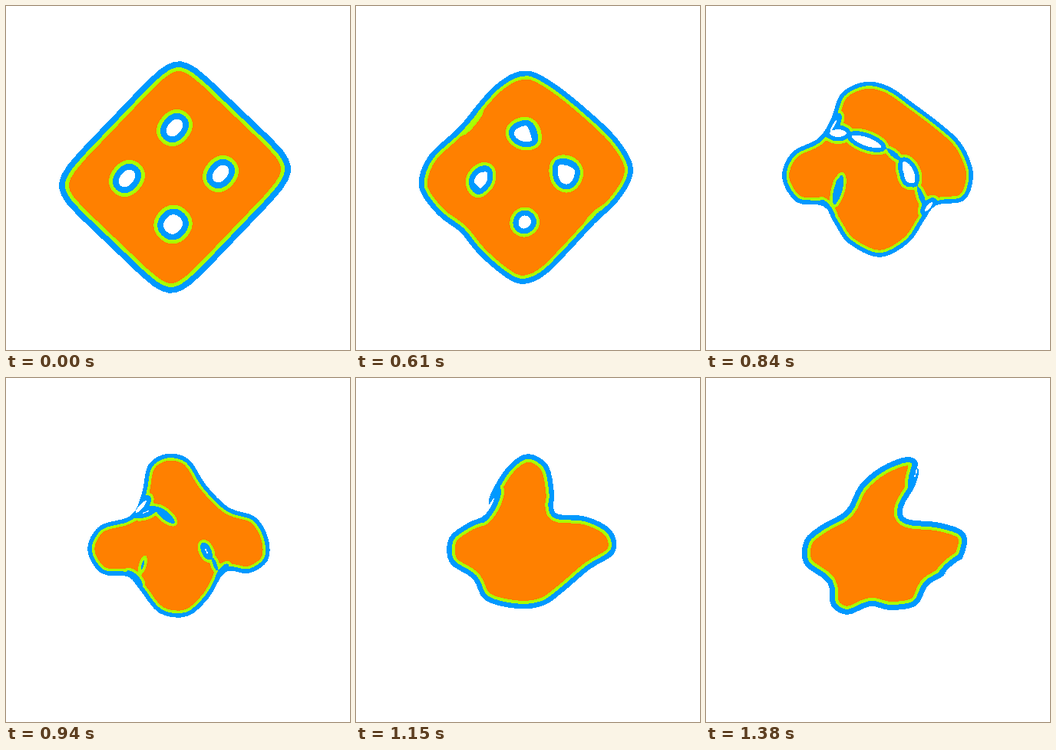
Write an HTML page with a canvas that moves like this. It is 448 px wide and 449 px high and loops after 2280 ms.

```html
<!DOCTYPE html>
<html lang="en">
<head>
<meta charset="utf-8">
<title>Morphing contours</title>
<style>
html, body { margin: 0; width: 100%; height: 100%; overflow: hidden; background: #fff; }
canvas { display: block; }
</style>
</head>
<body>
<canvas id="stage" width="448" height="449"></canvas>
<script>
const LOOP = 2280;
const LEFT = 60, TOP = 60, STEP = 2, COLS = 161, ROWS = 165;
const [WHITE, BLUE, GREEN, ORANGE] = [[255, 255, 255], [0, 153, 255], [170, 255, 0], [255, 128, 0]]
  .map(([r, g, b]) => (255 << 24 | b << 16 | g << 8 | r) >>> 0);
const ctx = document.getElementById('stage').getContext('2d');
const poses = [];

// Closed Catmull-Rom curve through x, y pairs.
function spline(...v) {
  const n = v.length, points = [];
  for (let i = 0; i < n; i += 2) {
    for (let u = 0; u < 1; u += 0.25) {
      points.push([0, 1].map(c => {
        const [a, b, d, e] = [-2, 0, 2, 4].map(k => v[(i + k + n) % n + c]);
        return b + u / 2 * (d - a + u * (2 * a - 5 * b + 4 * d - e + u * (3 * b - a - 3 * d + e)));
      }));
    }
  }
  return points;
}

// Superellipse: power 2 is an oval, higher powers approach a box.
function oval(cx, cy, rx, ry, degrees = 0, power = 2) {
  const turn = degrees * Math.PI / 180, cos = Math.cos(turn), sin = Math.sin(turn);
  const bend = w => Math.sign(w) * Math.abs(w) ** (2 / power);
  return Array.from({ length: 32 }, (_, i) => {
    const angle = (i + 0.5) * Math.PI / 16;
    const x = rx * bend(Math.cos(angle)), y = ry * bend(Math.sin(angle));
    return [cx + x * cos - y * sin, cy + x * sin + y * cos];
  });
}

// Signed distance to a closed shape, positive inside.
function depth(points, x, y) {
  let best = 1e9, inside = false;
  let [ax, ay] = points[points.length - 1];
  for (const [bx, by] of points) {
    const dx = bx - ax, dy = by - ay, px = x - ax, py = y - ay;
    const u = Math.min(1, Math.max(0, (px * dx + py * dy) / (dx * dx + dy * dy + 1e-9)));
    const ex = px - u * dx, ey = py - u * dy;
    best = Math.min(best, ex * ex + ey * ey);
    if ((ay > y) !== (by > y) && px < dx * py / dy) inside = !inside;
    ax = bx;
    ay = by;
  }
  return Math.sqrt(best) * (inside ? 1 : -1);
}

// A height map rising inwards from the outline and outwards from each hollow.
// A hollow's level says which colour edge it draws: 0 white, 1 blue, 2 green.
function pose(time, bands, outline, ...hollows) {
  const shapes = hollows.map(({ shape, level }) => ({ shape, base: [0, ...bands][level] }));
  const grid = new Float32Array(COLS * ROWS);
  for (let k = 0; k < grid.length; k++) {
    const x = LEFT + k % COLS * STEP, y = TOP + Math.floor(k / COLS) * STEP;
    let height = depth(outline, x, y);
    for (const { shape, base } of shapes) {
      if (height > -15) height = Math.min(height, base - depth(shape, x, y));
    }
    grid[k] = height;
  }
  poses.push({ time, bands, grid });
}

const hollow = level => (...args) => ({ level, shape: oval(...args) });
const white = hollow(0), blue = hollow(1), green = hollow(2);

const windows = [];
for (const i of [-1, 1]) {
  for (const j of [-1, 1]) {
    windows.push(white(218.5 + 31 * i + 30 * j, 222 - 33 * i + 30 * j, 12.5, i < j ? 11.5 : 8.5, -50, 2.4));
  }
}
pose(500, [7.7, 12.5], oval(220, 223.5, 124, 113.5, -46.3, 6.6), ...windows);

pose(690, [6, 9.5],
  spline(215,92, 256,107, 300,138, 338,175, 354,217, 338,254, 308,281, 270,323, 240,350,
    208,352, 166,321, 143,288, 112,268, 91,234, 97,196, 137,161, 164,124, 186,102),
  white(219.5, 172, 13, 9, 20), blue(220, 172, 24, 16, 25),
  white(166, 228, 11, 7, -70), blue(166, 228, 21, 12, -68),
  white(270, 219, 16, 11, 72), blue(269, 216, 24, 17, 60),
  white(221, 280, 4, 5), blue(221, 280, 12, 12),
  green(247, 190, 10, 6, 45), blue(133, 272, 18, 7, 35),
  green(311, 272, 20, 8, -40), green(152, 153, 24, 9, -53));

pose(840, [5.5, 9],
  spline(207,99, 238,105, 270,127, 302,151, 328,174, 342,197, 348,224, 336,254, 300,260, 284,280,
    264,309, 226,328, 186,310, 168,285, 152,261, 118,256, 99,224, 112,191, 146,173, 163,147, 176,114),
  white(215, 178, 7, 3, 15), blue(209, 177, 27, 11, 20),
  white(264, 221, 10, 6, 78), blue(264, 217, 21, 12, 65),
  blue(173, 231, 6, 4, -70), green(172, 240, 24, 9, -75),
  blue(166, 156, 18, 7, -60), green(172, 166, 20, 14),
  green(245, 194, 16, 7, 40), green(281, 250, 20, 7, 70),
  blue(290, 262, 14, 8, -50), blue(158, 266, 16, 6, 55));

pose(940, [5.5, 9],
  spline(209,99, 238,106, 260,139, 290,169, 324,181, 341,208, 341,238, 316,255, 286,253, 264,287,
    236,311, 200,307, 174,276, 158,259, 124,255, 106,224, 122,193, 162,180, 177,150, 185,114),
  blue(207, 179, 13, 5, 40), green(207, 179, 20, 9, 40),
  blue(261, 226, 10, 5, 60), green(261, 226, 16, 10, 65),
  blue(176, 168, 18, 8, -50), green(182, 175, 20, 10, -20),
  blue(281, 254, 14, 5, -55), green(272, 243, 14, 6, 70),
  blue(167, 262, 14, 6, 45), green(178, 244, 13, 5, -75));

pose(1150, [6.5, 10.5],
  spline(224,99, 250,114, 258,150, 257,168, 264,178, 300,181, 333,199, 337,228, 304,250, 270,279,
    244,297, 210,301, 168,290, 152,262, 122,241, 121,209, 146,189, 168,178, 176,150, 198,115),
  blue(175, 166, 26, 8, -62), blue(290, 264, 20, 5, -42), blue(158, 276, 16, 6, 60));

pose(1380, [7, 11],
  spline(262,103, 277,113, 273,139, 257,168, 262,184, 305,189, 338,203, 334,235, 311,257, 289,271,
    274,297, 240,303, 214,298, 184,309, 163,297, 158,267, 128,243, 128,212, 150,192, 182,173,
    200,140, 228,116),
  blue(274, 122, 26, 8, -72), blue(322, 246, 28, 9, -40));

const width = (COLS - 1) * STEP, height = (ROWS - 1) * STEP;
const image = ctx.createImageData(width, height);
const pixels = new Uint32Array(image.data.buffer);
const mixed = new Float32Array(COLS * ROWS);
const lerp = (a, b, u) => a + (b - a) * u;

function draw(time) {
  let i = 0;
  while (i < poses.length - 2 && time >= poses[i + 1].time) i++;
  const from = poses[i], to = poses[i + 1];
  const u = Math.min(1, Math.max(0, (time - from.time) / (to.time - from.time)));
  const [greenAt, orangeAt] = from.bands.map((band, k) => lerp(band, to.bands[k], u));
  for (let k = 0; k < mixed.length; k++) mixed[k] = lerp(from.grid[k], to.grid[k], u);
  for (let y = 0; y < height; y++) {
    const row = Math.floor(y / STEP) * COLS, fy = (y % STEP + 0.5) / STEP;
    for (let x = 0; x < width; x++) {
      const k = row + Math.floor(x / STEP), fx = (x % STEP + 0.5) / STEP;
      const value = lerp(lerp(mixed[k], mixed[k + 1], fx),
        lerp(mixed[k + COLS], mixed[k + COLS + 1], fx), fy);
      pixels[y * width + x] = value > orangeAt ? ORANGE : value > greenAt ? GREEN : value > 0 ? BLUE : WHITE;
    }
  }
  ctx.putImageData(image, LEFT, TOP);
}

ctx.fillStyle = '#fff';
ctx.fillRect(0, 0, 448, 449);
draw(0);
let start;
function tick(now) {
  start ??= now;
  draw((now - start) % LOOP);
  requestAnimationFrame(tick);
}
requestAnimationFrame(tick);
</script>
</body>
</html>
```
